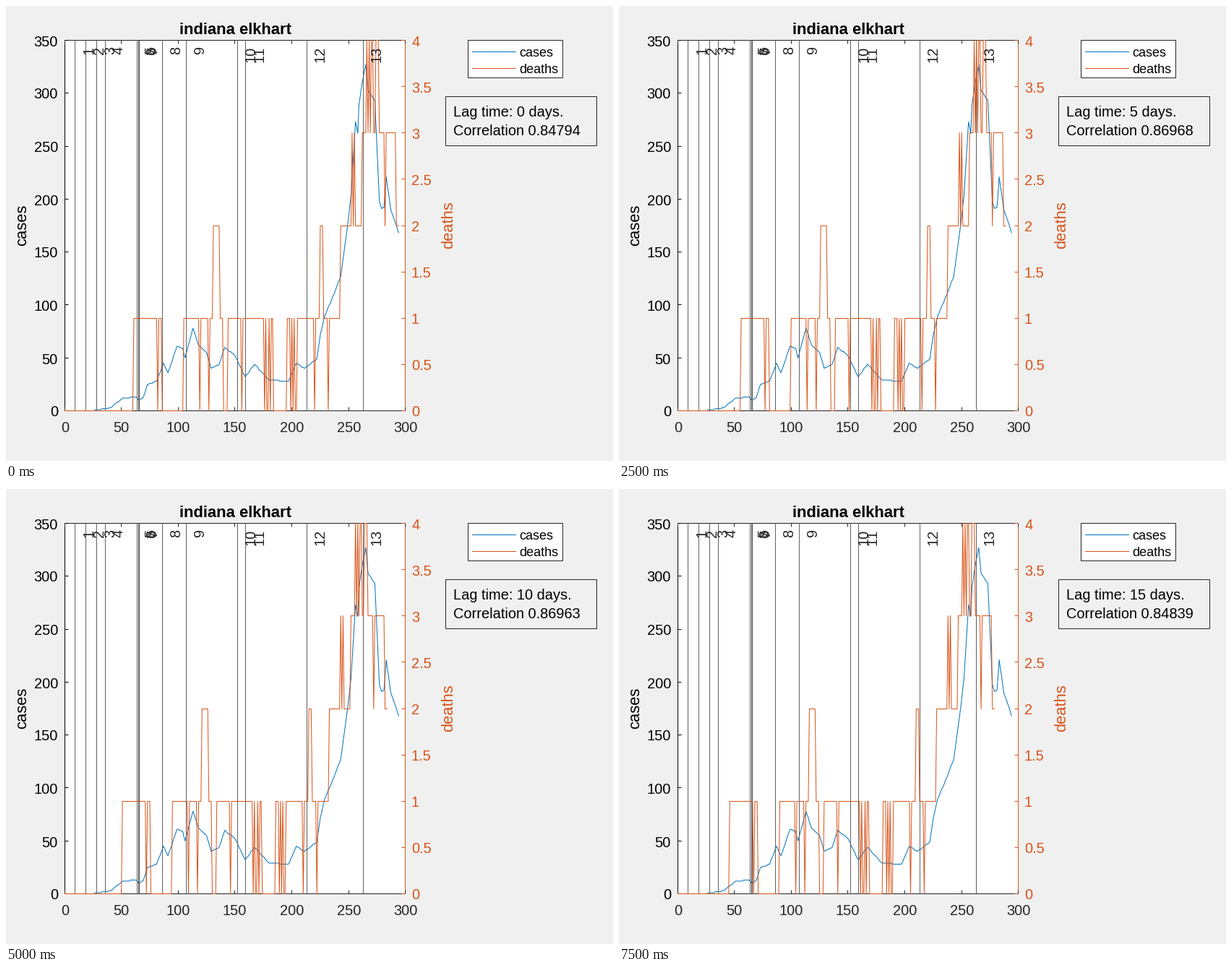
Animation of 840x630 px, one loop 8000 ms. Source, as a matplotlib script:

```python
import numpy as np
import matplotlib.pyplot as plt
from matplotlib.animation import FuncAnimation
from matplotlib.patches import Rectangle

plt.rcParams["font.family"] = "Liberation Sans"
plt.rcParams["text.kerning_factor"] = 6  # evenly spaced digits

W, H, DPI = 840, 630, 100
PT = 72 / DPI
LEFT, RIGHT, TOP, BOTTOM = 81, 552.9, 47.5, 560.5
BLUE, ORANGE, DARK = "#0072BD", "#D95319", "#262626"
LAST = 294

# turning points of the case curve: (day, cases)
TURNS = [
    (0, 0), (24, 0), (41, 3), (51, 12), (63, 13), (65, 10), (69, 12),
    (73, 25), (81, 28), (87, 45), (91, 36), (99, 61), (104, 59), (106, 50),
    (113, 78), (118, 62), (125, 55), (129, 40), (136, 44), (141, 60),
    (150, 52), (159, 32), (167, 44), (180, 29), (197, 28), (204, 45),
    (211, 40), (222, 49), (225, 72), (229, 90), (235, 105), (243, 127),
    (249, 175), (252, 203), (256, 273), (258, 262), (259, 289), (262, 311),
    (265, 327), (267, 303), (273, 293), (277, 198), (279, 191), (281, 192),
    (283, 221), (287, 190), (291, 178), (294, 168),
]
# stretches of constant deaths: (first day, last day, deaths)
PLATEAUS = [
    (61, 85, 1), (105, 139, 1), (144, 183, 1), (196, 242, 1), (131, 136, 2),
    (225, 227, 2), (243, LAST, 2), (253, 255, 3), (262, 291, 3), (266, 276, 4),
]
# days with one death fewer than the stretch around them
DIPS = [82, 119, 127, 156, 176, 178, 179, 181, 199, 201, 203, 204, 220, 232,
        254, 267, 269, 272, 273, 282]
EVENTS = [9, 19, 28, 36, 64, 65, 66, 86, 107, 152, 159, 213, 263]
LAGS = [0, 4, 7, 9, 11, 13, 15]
CORRELATION = [0.84794, 0.86788, 0.87329, 0.87131, 0.86794, 0.85904, 0.84839]

days = np.arange(LAST + 1)
cases = np.round(np.interp(days, *zip(*TURNS)))
deaths = np.zeros(LAST + 1)
for first, last, level in PLATEAUS:
    deaths[first:last + 1] = level
deaths[DIPS] -= 1


def px(day):
    return LEFT + (RIGHT - LEFT) * day / 300


def py(value, top):
    return BOTTOM - (BOTTOM - TOP) * value / top


def crisp(v):
    return np.floor(v) + 0.5


fig = plt.figure(figsize=(W / DPI, H / DPI), dpi=DPI, facecolor="#f0f0f0")
ax = fig.add_axes([0, 0, 1, 1])
ax.set_xlim(0, W)
ax.set_ylim(H, 0)
ax.axis("off")


def line(x, y, color, z=2):
    return ax.plot(x, y, color=color, lw=PT, snap=False, zorder=z,
                   solid_capstyle="butt", solid_joinstyle="round")[0]


def text(x, y, s, size=20, color="black", ha="left", **kw):
    return ax.text(x, y, s, fontsize=size * PT, color=color, ha=ha,
                   va="baseline", zorder=6, **kw)


def vertical(x, y, s, size=20, color="black", ha="center"):
    return text(x, y, s, size, color, ha, rotation=90, rotation_mode="anchor")


def box(x0, y0, x1, y1, face):
    ax.add_patch(Rectangle((x0, y0), x1 - x0, y1 - y0, fc=face, ec=DARK,
                           lw=PT, snap=False, zorder=1))


# plot area
L, R = crisp(LEFT), crisp(RIGHT)
ax.add_patch(Rectangle((L, TOP), R - L, BOTTOM - TOP, fc="white", lw=0,
                       zorder=0))
line([L, R], [TOP, TOP], DARK, 1)
line([L, R], [BOTTOM, BOTTOM], DARK, 1)
line([L, L], [TOP, BOTTOM], "black", 1)
line([R, R], [TOP, BOTTOM], ORANGE, 1)

for day in range(0, 301, 50):
    x = crisp(px(day))
    line([x, x], [BOTTOM, BOTTOM - 5], DARK, 1)
    line([x, x], [TOP, TOP + 5], DARK, 1)
    text(x, 590, str(day), color=DARK, ha="center")
for n in range(0, 351, 50):
    y = crisp(py(n, 350))
    line([L, L + 5], [y, y], "black", 1)
    text(72, y + 8, str(n), ha="right")
for n in np.arange(0, 4.5, 0.5):
    y = crisp(py(n, 4))
    line([R - 5, R], [y, y], ORANGE, 1)
    text(561, y + 8, f"{n:g}", color=ORANGE)

text(317, 39, "indiana elkhart", 22, ha="center", weight="bold")
vertical(28, 303, "cases", 22)
vertical(618.5, 303, "deaths", 22, ORANGE)

# event markers
for i, day in enumerate(EVENTS, 1):
    x = crisp(px(day))
    line([x, x], [TOP, BOTTOM], "#606060", 3)
    vertical(x + 24.5, 56, str(i), color=DARK, ha="right")

# legend and readout
box(639.5, 47.5, 770.5, 99.5, "white")
for y, name, color in [(63.5, "cases", BLUE), (86.5, "deaths", ORANGE)]:
    line([645, 706], [y, y], color)
    text(710, y + 6.5, name, 18)
box(608.5, 125.5, 817.5, 193.5, "#f0f0f0")
lag_text = text(619, 153, "")
corr_text = text(619, 179, "")

line(px(days), py(cases, 350), BLUE, 2)
death_line = line([], [], ORANGE, 4)


def update(lag):
    death_line.set_data(px(days[lag:] - lag), crisp(py(deaths[lag:], 4)))
    lag_text.set_text(f"Lag time: {lag} days.")
    corr_text.set_text(f"Correlation {np.interp(lag, LAGS, CORRELATION):.5f}")
    return death_line, lag_text, corr_text


anim = FuncAnimation(fig, update, frames=16, interval=500, repeat=True,
                     repeat_delay=0, blit=False)
plt.show()
```
